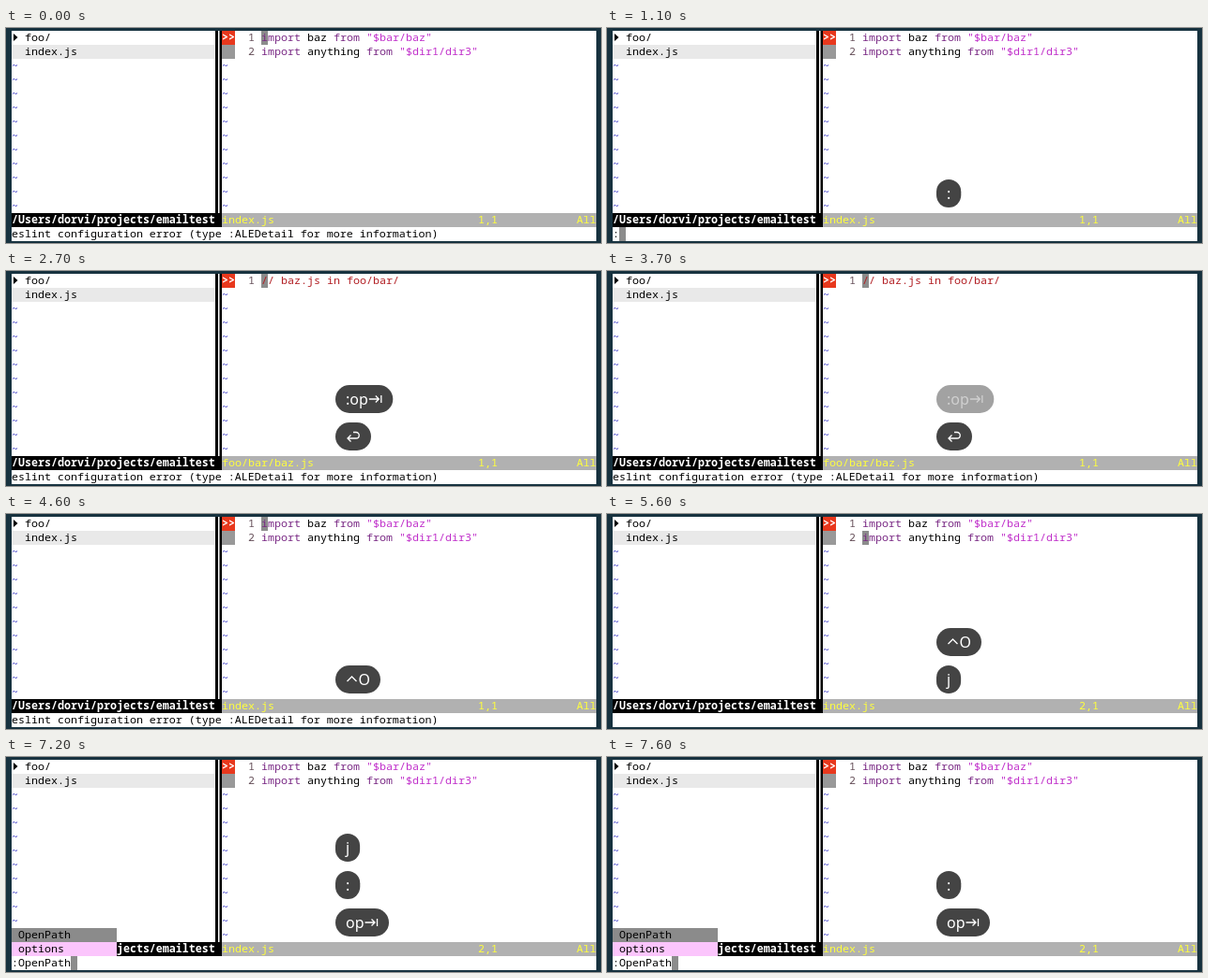
An HTML page with a canvas that plays this animation: 634 by 230 pixels, repeating every 8 s.

```html
<!DOCTYPE html>
<html lang="en">
<head>
<meta charset="utf-8">
<title>Vim: open path under cursor</title>
<style>
html, body { margin: 0; width: 634px; height: 230px; overflow: hidden; }
canvas { display: block; }
</style>
</head>
<body>
<canvas id="stage" width="634" height="230"></canvas>
<script>
const ctx = document.getElementById("stage").getContext("2d");
const LOOP = 8000, FADE = 180;
const CELL = 7, ROW = 15, LEFT = 6, TOP = 3, SPLIT = 32;
const MONO = '11.67px "Noto Sans Mono", monospace';
const SANS = '16px "Noto Sans", sans-serif';
const C = {
  frame: "#17323f", keyword: "#7a2a85", string: "#c02fca", comment: "#b21f24",
  tilde: "#3434c4", number: "#66505a", cursor: "#8c8c8c", status: "#b1b1b1",
  yellow: "#ffff3c", sign: "#e8381d", signColumn: "#999", current: "#e9e9e9",
  menu: "#8b8b8b", menuItem: "#fbc5fc", bubble: "#444"
};
const LINT = "eslint configuration error (type :ALEDetail for more information)";

// Bubbles of pressed keys: [time, key] pairs and the start of the fade-out
const bubbles = [
  { keys: [[500, ":"], [1400, "o"], [1500, "p"], [1600, "tab"]], fade: 3610 },
  { keys: [[2400, "enter"]], fade: 4410 },
  { keys: [[4300, "ctrl"], [4300, "O"]], fade: 6410 },
  { keys: [[5400, "j"]], fade: 7410 },
  { keys: [[6000, ":"]], fade: LOOP },
  { keys: [[6900, "o"], [7000, "p"], [7200, "tab"]], fade: LOOP }
];

// Command line over time; null means normal mode
const commands = [
  [0, null], [500, ":"], [1400, ":o"], [1500, ":op"], [1600, ":OpenPath"], [2400, null],
  [6000, ":"], [6900, ":o"], [7000, ":op"], [7200, ":OpenPath"]
];

// Key symbols: advance width and path around the middle of the bubble
const icons = {
  tab: { width: 15.5, path: "M1 0H11.5M8 -3.5L11.5 0L8 3.5M14 -4V4" },
  enter: { width: 16, path: "M5.5 -1.5L2 2L5.5 5.5M2 2H11A3.2 3.2 0 0 0 11 -4.5H8" },
  ctrl: { width: 13.5, path: "M1.5 2L6.5 -3L11.5 2" }
};

const colX = col => LEFT + col * CELL;
const rowY = row => TOP + row * ROW;

function fill(col, row, cols, color, rows = 1) {
  ctx.fillStyle = color;
  ctx.fillRect(colX(col), rowY(row), cols * CELL, rows * ROW);
}

function write(col, row, text, color = "#000", bold = false) {
  ctx.font = (bold ? "bold " : "") + MONO;
  ctx.fillStyle = color;
  ctx.fillText(text, colX(col), rowY(row) + 11);
}

function writeRuns(col, row, runs) {
  for (const [text, color] of runs) {
    write(col, row, text, color);
    col += text.length;
  }
}

function importLine(row, name, path) {
  writeRuns(38, row, [["import ", C.keyword], [name + " ", "#000"], ["from ", C.keyword], [`"${path}"`, C.string]]);
}

function drawTree() {
  fill(0, 1, 31, C.current);
  ctx.fillStyle = "#000";
  ctx.fill(new Path2D("M8 6L12.5 10L8 14Z"));
  write(2, 0, "foo/");
  write(2, 1, "index.js");
  for (let row = 2; row < 13; row++) write(0, row, "~", C.tilde);
  fill(31, 0, 1, "#000", 13);
  ctx.fillStyle = "#fff";
  ctx.fillRect(226, TOP, 1.5, 13 * ROW);
  fill(0, 13, 32, "#000");
  write(0, 13, "/Users/dorvi/projects/emailtest", "#fff", true);
}

function drawEditor(inBaz, line, typing) {
  const lines = inBaz ? 1 : 2;
  fill(SPLIT, 0, 2, C.sign);
  write(SPLIT, 0, ">>", "#fff", true);
  if (!inBaz) fill(SPLIT, 1, 2, C.signColumn);
  if (!typing) fill(38, line - 1, 1, C.cursor);
  for (let n = 1; n <= lines; n++) write(36, n - 1, String(n), C.number);
  if (inBaz) {
    write(38, 0, "// baz.js in foo/bar/", C.comment);
  } else {
    importLine(0, "baz", "$bar/baz");
    importLine(1, "anything", "$dir1/dir3");
  }
  for (let row = lines; row < 13; row++) write(SPLIT, row, "~", C.tilde);
  fill(SPLIT, 13, 57, C.status);
  write(SPLIT, 13, inBaz ? "foo/bar/baz.js" : "index.js", C.yellow);
  write(71, 13, line + ",1", C.yellow);
  write(86, 13, "All", C.yellow);
}

function drawCommand(command, line) {
  if (command === null) {
    if (line === 1) write(0, 14, LINT);
    return;
  }
  write(0, 14, command);
  fill(command.length, 14, 1, C.cursor);
  if (command === ":OpenPath") {
    fill(0, 12, 16, C.menu);
    fill(0, 13, 16, C.menuItem);
    write(1, 12, "OpenPath");
    write(1, 13, "options");
  }
}

function drawBubble(keys, y, alpha) {
  ctx.font = SANS;
  const widths = keys.map(key => icons[key] ? icons[key].width : ctx.measureText(key).width);
  const width = 22 + widths.reduce((a, b) => a + b);
  ctx.globalAlpha = alpha;
  ctx.fillStyle = C.bubble;
  ctx.beginPath();
  ctx.roundRect(351, y, width, 30, Math.min(15, width / 2));
  ctx.fill();
  ctx.fillStyle = ctx.strokeStyle = "#fff";
  ctx.lineWidth = 1.3;
  let x = 362;
  keys.forEach((key, i) => {
    if (icons[key]) {
      ctx.save();
      ctx.translate(x, y + 15);
      ctx.stroke(new Path2D(icons[key].path));
      ctx.restore();
    } else {
      ctx.fillText(key, x, y + 21);
    }
    x += widths[i];
  });
  ctx.globalAlpha = 1;
}

function drawBubbles(t) {
  const started = bubbles.filter(b => t >= b.keys[0][0]).reverse();
  started.forEach((b, slot) => {
    const alpha = Math.min(1, 1 - (t - b.fade) / FADE);
    if (alpha <= 0) return;
    drawBubble(b.keys.filter(k => t >= k[0]).map(k => k[1]), 162 - 40 * slot, alpha);
  });
}

function draw(t) {
  const command = commands.filter(c => t >= c[0]).pop()[1];
  const inBaz = t >= 2400 && t < 4300;
  const line = t >= 5400 ? 2 : 1;
  ctx.fillStyle = C.frame;
  ctx.fillRect(0, 0, 634, 230);
  fill(0, 0, 89, "#fff", 15);
  drawTree();
  drawEditor(inBaz, line, command !== null);
  drawCommand(command, line);
  drawBubbles(t);
}

const start = performance.now();
function tick() {
  draw((performance.now() - start) % LOOP);
  requestAnimationFrame(tick);
}
tick();
</script>
</body>
</html>
```
